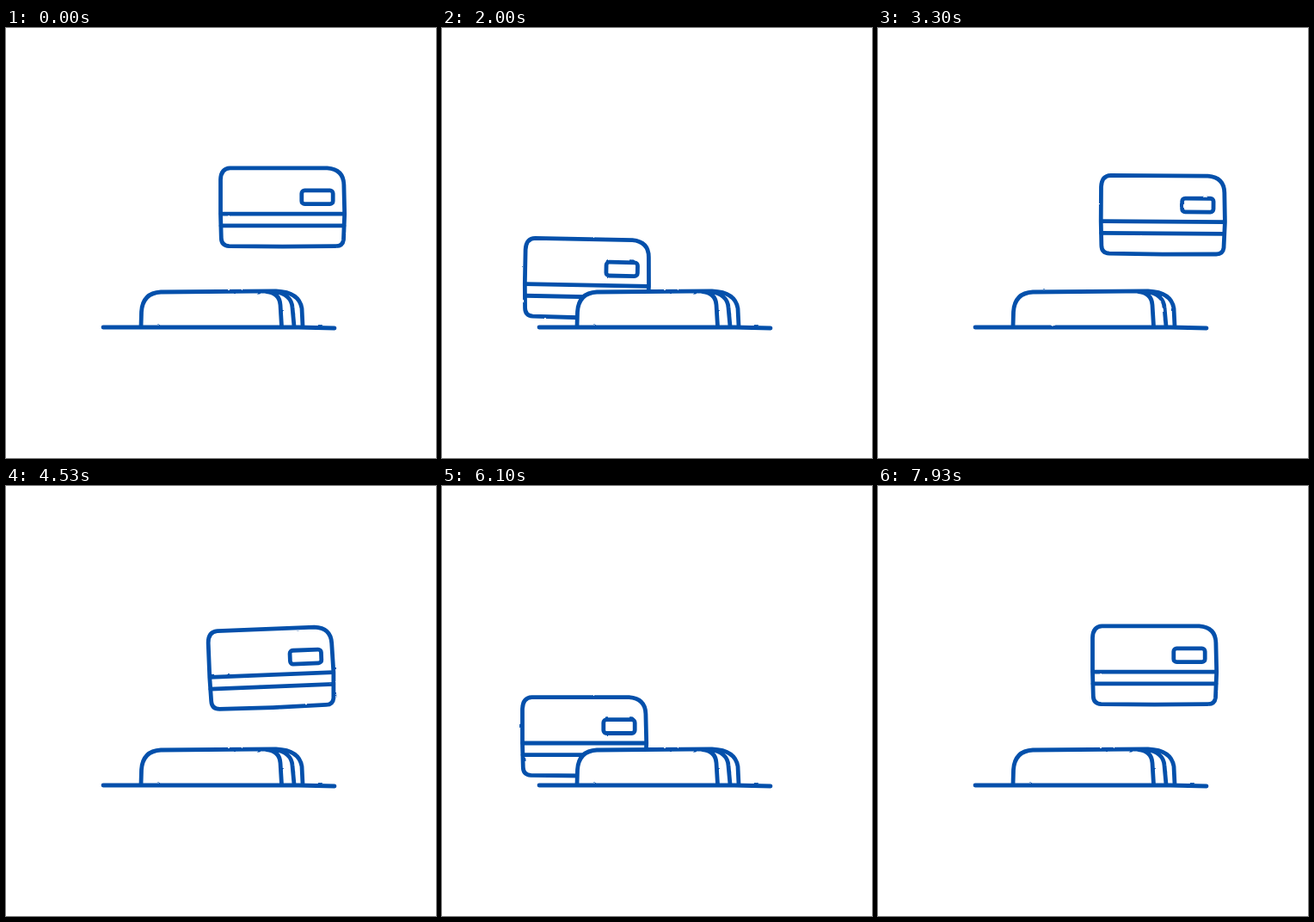
An HTML page that plays this animation: 500x500 px, repeating every 8010 ms.

```html
<!DOCTYPE html>
<html lang="en">
<head>
<meta charset="utf-8">
<title>Card swipe</title>
<style>
  html, body { margin: 0; width: 100%; height: 100%; overflow: hidden; background: #fff; }
  svg { display: block; width: 100%; height: 100%; }
</style>
</head>
<body>
<svg viewBox="0 0 500 500">
  <defs>
    <filter id="rough" filterUnits="userSpaceOnUse" x="0" y="0" width="500" height="500" color-interpolation-filters="sRGB">
      <feTurbulence id="noise" type="fractalNoise" baseFrequency="0.08" numOctaves="2" result="n"/>
      <feDisplacementMap in="SourceGraphic" in2="n" scale="1.8" xChannelSelector="R" yChannelSelector="G"/>
    </filter>
  </defs>
  <g filter="url(#rough)" fill="none" stroke="#0450ab" stroke-width="4.8" stroke-linecap="round" stroke-linejoin="round">
    <g id="card">
      <path d="M-61 -45.4 H52 Q71 -44 71.4 -26 L72.2 8 L71 38 Q70 45.5 62 45.4 L0 46 L-62 45.4 Q-71 45 -71.2 36 L-72 8 V-32 Q-71.5 -45 -61 -45.4 Z"/>
      <path d="M-71.5 8 H71.5 M-71.5 21.7 H71.5"/>
      <rect x="22.3" y="-19.3" width="36.4" height="15.8" rx="3.5"/>
    </g>
    <g id="base">
      <path fill="#fff" stroke="none" d="M157 348 Q155 307 180 307 L315 306 Q345 308 345 348 Z"/>
      <path d="M157 347 L157.5 330 Q159 308 180 307 L314 305.8 Q341 307 344 326 L345 347"/>
      <path d="M303 306.5 Q318 308 319 322 L320.5 347 M313 306.5 Q332 310 333 325 L335 347"/>
      <path d="M113 348 H340 L382 349"/>
    </g>
  </g>
</svg>
<script>
const LOOP = 8010, CYCLE = 80;
const card = document.getElementById('card');
const base = document.getElementById('base');
const noise = document.getElementById('noise');

const clamp = u => Math.min(1, Math.max(0, u));

// Eased travel by `amount` between two steps; bias above 1 starts slower, below 1 faster.
function move(k, from, to, amount, bias = 1) {
  const u = clamp((k - from) / (to - from)) ** bias;
  return amount * u * u * (3 - 2 * u);
}

// Drift left, wind up, swipe right, return home.
const cardX = k => 321.5
  + move(k, 0, 32, -137, 1.55)
  + move(k, 34, 42, -19)
  + move(k, 42, 56, 255, 0.46)
  + move(k, 56, 72, -99, 0.46);

// Sink a little, lift, drop, return home.
const cardY = k => 208.2
  + move(k, 0, 16, 4.4)
  + move(k, 16, 35, -42, 3)
  + move(k, 34, 40, 120.4)
  + move(k, 52, 71, -82.8, 0.75);

const cardTurn = k => move(k, 0, 16, -3)
  + move(k, 16, 30, 10.3)
  + move(k, 34, 42, -7.3)
  + move(k, 44, 55, 10)
  + move(k, 55, 68, -10, 0.74);

const baseStretch = k => 1 + 0.02 * Math.sin(Math.PI * clamp((k - 46) / 18));

// Poses advance 20 times a second, shown on a 30 per second clock.
function stepAt(ms) {
  const tick = Math.min(239, Math.floor((ms + 4) * 0.03));
  return Math.round(tick * 2 / 3) % CYCLE;
}

function draw(ms) {
  const k = stepAt(ms);
  const s = baseStretch(k);
  card.setAttribute('transform', `translate(${cardX(k)} ${cardY(k)}) rotate(${cardTurn(k)})`);
  base.setAttribute('transform', `translate(${247.5 * (1 - s)} 0) scale(${s} 1)`);
  noise.setAttribute('seed', Math.floor((k + 1) / 5) % 2 ? 8 : 3);
}

const start = performance.now();
function loop() {
  draw((performance.now() - start) % LOOP);
  requestAnimationFrame(loop);
}
loop();
</script>
</body>
</html>
```
